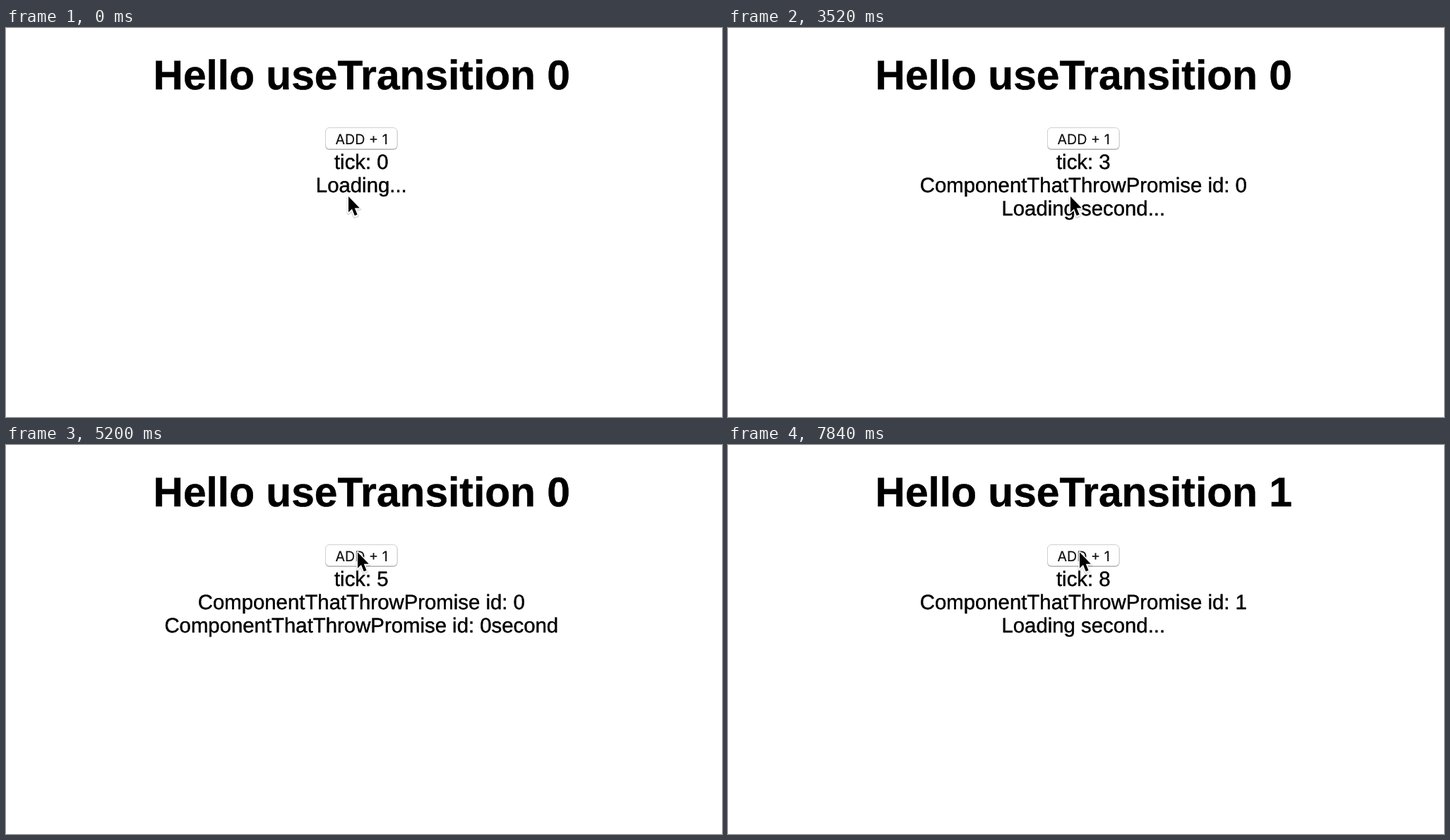
An HTML page that plays this animation: 1014 px wide and 552 px high, repeating every 8000 ms.

```html
<!DOCTYPE html>
<html lang="en">
<head>
<meta charset="utf-8">
<title>useTransition demo</title>
<style>
  html, body { margin: 0; width: 100%; height: 100%; overflow: hidden; background: #fff; }
  svg { display: block; width: 100vw; height: 100vh; }
  text {
    font: 29.35px "Liberation Sans", Arial, sans-serif;
    text-anchor: middle; text-rendering: geometricPrecision;
    fill: #000; stroke: #000; stroke-width: .45px;
  }
  #title { font-size: 58.7px; font-weight: bold; }
  #label { font: 19.7px Inter, Roboto, sans-serif; fill: #111; stroke-width: .15px; }
  #pending { text-anchor: start; }
</style>
</head>
<body>
<svg viewBox="0 0 1014 552">
  <rect width="1014" height="552" fill="#fff"/>
  <text id="title" x="503.7" y="86.5"></text>
  <rect x="452" y="142" width="102.5" height="31" rx="6" fill="#b8b8b8"/>
  <rect x="452.5" y="141.5" width="101.5" height="30" rx="5.5" fill="#fff" stroke="#d0d0d0"/>
  <text id="label" x="503.6" y="165">ADD + 1</text>
  <text id="pending" x="554.4" y="165">pending</text>
  <text id="tick" x="503.3" y="200"></text>
  <text id="first" x="503.3" y="233"></text>
  <text id="second" x="503.3" y="266"></text>
  <g id="cursor" stroke-linejoin="round">
    <path d="M0 0V22.5L5 17.8L8.8 27.3L12.6 25.7L8.8 16.5H15.8Z" transform="translate(0 1.5)"
          fill="none" stroke="#000" stroke-opacity=".12" stroke-width="5"/>
    <path d="M0 0V22.5L5 17.8L8.8 27.3L12.6 25.7L8.8 16.5H15.8Z"
          fill="#000" stroke="#fff" stroke-width="3" paint-order="stroke"/>
  </g>
</svg>
<script>
const LOOP = 8000, STEP = 80;
const tickTimes = [800, 1760, 2720, 3680, 4640, 5520, 6560, 7520];
const firstReady = 1680, secondReady = 3680, clicked = 5840, nextReady = 7680;
const moveStart = 4080, moveTime = 720;
const rest = { x: 485, y: 239 }, button = { x: 498, y: 152.3 };

const el = id => document.getElementById(id);
const parts = Object.fromEntries(
  ["title", "pending", "tick", "first", "second", "cursor"].map(id => [id, el(id)]));
const mix = (a, b, k) => a + (b - a) * k;

function write(part, text) {
  if (part.textContent !== text) part.textContent = text;
}

function cursorAt(t) {
  const u = Math.min(1, Math.max(0, (t - moveStart) / moveTime));
  const k = u * u * (3 - 2 * u);
  return [mix(rest.x, button.x, Math.sqrt(k)), mix(rest.y, button.y, k)];
}

function draw(time) {
  const t = Math.floor((time % LOOP) / STEP) * STEP;
  const component = id => `ComponentThatThrowPromise id: ${id}`;
  const id = t >= nextReady ? 1 : 0;
  const secondShown = t >= secondReady && t < nextReady;

  write(parts.title, `Hello useTransition ${t >= clicked ? 1 : 0}`);
  write(parts.tick, `tick: ${tickTimes.filter(at => at <= t).length}`);
  write(parts.first, t < firstReady ? "Loading..." : component(id));
  write(parts.second, t < firstReady ? "" : secondShown ? component(id) + "second" : "Loading second...");
  parts.pending.setAttribute("visibility", t >= clicked && t < nextReady ? "visible" : "hidden");
  parts.cursor.setAttribute("transform", `translate(${cursorAt(t)})`);
}

function loop() {
  draw(performance.now());
  requestAnimationFrame(loop);
}
loop();
</script>
</body>
</html>
```
